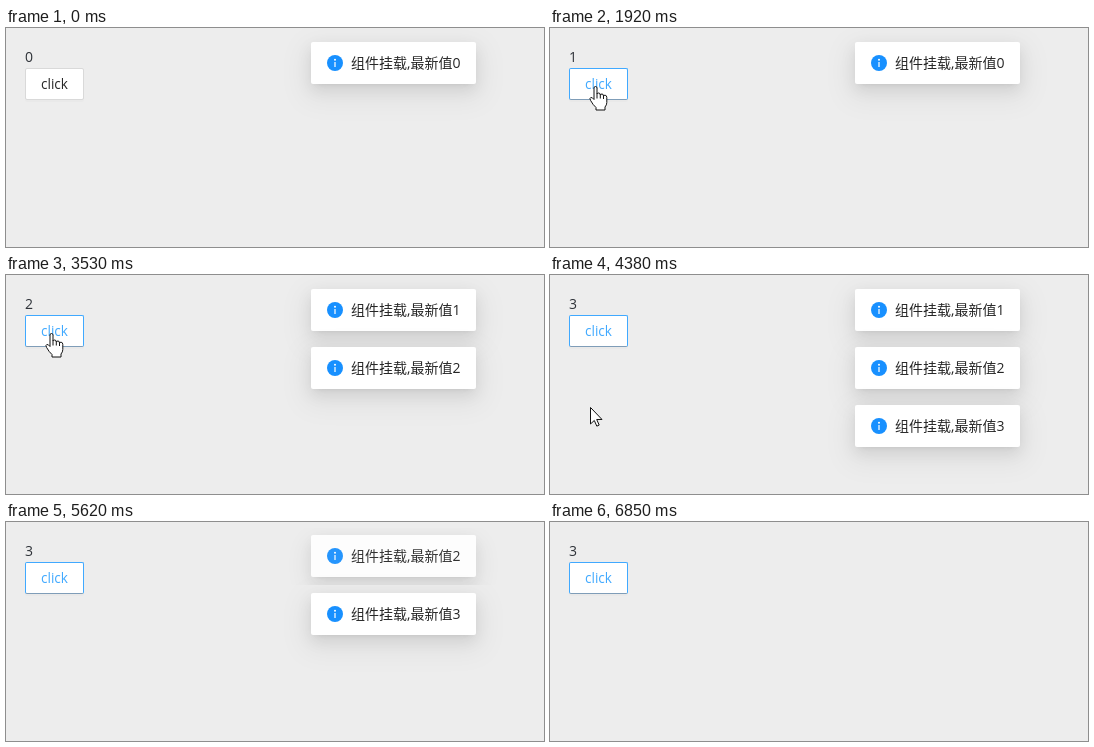
Recreate the animation shown at these times as an HTML page with a canvas. Size 538 px wide and 219 px high, loop 6920 ms.

```html
<!DOCTYPE html>
<html lang="zh-CN">
<head>
<meta charset="utf-8">
<style>
  html, body { margin: 0; width: 100%; height: 100%; overflow: hidden; background: #ededed; }
  body { position: relative; color: #2e3238; font: 14px/22px "Open Sans", "Noto Sans CJK SC", "Noto Sans CJK", sans-serif; }
  #count { position: absolute; left: 19px; top: 18px; }
  #button {
    position: absolute; left: 19px; top: 40px; width: 59px; height: 32px; box-sizing: border-box;
    border: 1px solid; border-radius: 2px; background: #fff; box-shadow: 0 2px 0 rgba(0, 0, 0, .015);
    font-size: 13.6px; line-height: 30px; text-align: center;
  }
  #wave { position: absolute; left: 19px; top: 40px; width: 59px; height: 32px; border-radius: 2px; }
  .notice { position: absolute; left: 0; width: 538px; }
  .card {
    position: absolute; left: 305px; width: 165px; height: 42px; border-radius: 2px; background: #fff;
    color: #262626; white-space: nowrap;
    box-shadow: 0 3px 6px -4px rgba(0, 0, 0, .12), 0 6px 16px rgba(0, 0, 0, .08), 0 9px 28px 8px rgba(0, 0, 0, .05);
  }
  .card svg { position: absolute; left: 16px; top: 13px; }
  .card span { position: absolute; left: 40px; top: 10px; }
  canvas { position: absolute; left: 0; top: 0; }
</style>
</head>
<body>
<div id="count">0</div>
<div id="wave"></div>
<div id="button">click</div>
<div id="list"></div>
<canvas id="pointer" width="538" height="219"></canvas>
<script>
const LOOP = 6920, STEP = 1000 / 13;
const $ = id => document.getElementById(id);
const ctx = $('pointer').getContext('2d');
const clamp = v => Math.min(1, Math.max(0, v));
const lerp = (a, b, p) => a + (b - a) * p;
const progress = (t, start, length) => clamp((t - start) / length);

function bezier(x1, y1, x2, y2) {
  const at = (a, b, s) => 3 * a * s * (1 - s) ** 2 + 3 * b * s * s * (1 - s) + s ** 3;
  return x => {
    if (x <= 0 || x >= 1) return clamp(x);
    let lo = 0, hi = 1;
    for (let i = 0; i < 24; i++) {
      const mid = (lo + hi) / 2;
      if (at(x1, x2, mid) < x) lo = mid; else hi = mid;
    }
    return at(y1, y2, lo);
  };
}
const easeOut = bezier(.08, .82, .17, 1);
const easeIn = bezier(.6, .04, .98, .34);

const notices = [
  { enter: -1000, leave: 2645 },
  { enter: 1960, leave: 4879 },
  { enter: 2581, leave: 5500 },
  { enter: 3577, leave: 6495 }
];
const counts = [1900, 2515, 3580];
const waves = [1985, 2625, 3600];

notices.forEach((n, i) => {
  n.box = document.createElement('div');
  n.box.className = 'notice';
  n.box.innerHTML = `<div class="card">
    <svg width="16" height="16"><circle cx="8" cy="8" r="8" fill="#1890ff"/>
    <circle cx="8" cy="4.8" r="1" fill="#fff"/><rect x="7.4" y="7" width="1.2" height="5" fill="#fff"/></svg>
    <span>组件挂载,最新值${i}</span></div>`;
  n.card = n.box.firstChild;
  $('list').append(n.box);
});

function drawNotices(t) {
  let y = 6;
  for (const n of notices) {
    const alive = t >= n.enter && t < n.leave + 300;
    n.box.style.display = alive ? 'block' : 'none';
    if (!alive) continue;
    const shown = easeOut(progress(t, n.enter, 300));
    const rest = 1 - easeIn(progress(t, n.leave, 300));
    const pad = 8 * rest;
    const height = Math.min(42 + 2 * pad, 150 * rest);
    Object.assign(n.box.style, {
      top: y + 'px',
      height: height + 'px',
      opacity: shown * rest,
      overflow: t > n.leave ? 'hidden' : 'visible',
      transform: shown < 1 ? `translateY(${-58 * (1 - shown)}px)` : 'none'
    });
    n.card.style.top = pad + 'px';
    y += height;
  }
}

function mix(from, to, p) {
  return `rgb(${from.map((v, i) => Math.round(lerp(v, to[i], p)))})`;
}

function drawButton(t) {
  const hover = progress(t, 830, 300);
  const blue = [64, 169, 255], edge = [217, 217, 217];
  const style = $('button').style;
  style.color = mix([38, 38, 38], blue, hover);
  style.borderColor = mix(edge, blue, hover);
  style.borderBottomColor = mix(edge, [127, 157, 184], hover);

  const start = waves.find(w => t >= w && t < w + 330);
  const age = t - start;
  $('wave').style.boxShadow = start === undefined ? 'none' :
    `0 0 0 ${4.5 * easeOut(age / 400)}px rgba(24,144,255,${.2 * (1 - easeOut(age / 2000))})`;
}

const arrow = new Path2D('M0 0V16.5L3.8 13L6.3 18.7L8.7 17.6L6.2 12H11.5Z');
const hand = new Path2D('M-1.5 13V1.5Q-1.5 0 0 0Q1.5 0 1.5 1.5V7.5Q1.8 6.5 3.2 6.5Q4.8 6.5 4.8 8.5' +
  'Q5.2 7.5 6.5 7.5Q8 7.5 8 9.5Q8.4 8.7 9.6 8.7Q11.3 8.9 11.3 11V16Q11.3 18.5 9.5 20.5V23.5H0.5V21' +
  'Q-2.5 18.5 -5 13.8Q-6.2 11.5 -4.7 11Q-3.2 10.6 -1.5 13Z');
const fingers = new Path2D('M1.5 7V12M4.8 8V12M8 9V12.5');

function drawPointer(t) {
  ctx.clearRect(0, 0, 538, 219);
  if (t < 440 || t > 4600) return;
  let x, y;
  if (t < 4140) {
    const p = 1 - (1 - progress(t, 440, 480)) ** 2;
    x = lerp(274, 45.5, p);
    y = lerp(187, 58.5, p);
  } else if (t < 4222) {
    const p = progress(t, 4140, 82);
    x = lerp(45.5, 49.5, p);
    y = lerp(58.5, 70.5, p);
  } else {
    const p = progress(t, 4222, 378);
    x = lerp(49.5, 27.5, p);
    y = lerp(70.5, 222, p);
  }
  const over = x >= 19 && x <= 78 && y >= 40 && y <= 72;
  ctx.save();
  ctx.translate(x, y);
  ctx.lineJoin = 'round';
  ctx.fillStyle = '#fff';
  ctx.strokeStyle = '#111';
  ctx.fill(over ? hand : arrow);
  ctx.stroke(over ? hand : arrow);
  if (over) ctx.stroke(fingers);
  ctx.restore();
}

function render(now) {
  // The screen refreshes 13 times a second.
  const t = Math.floor((now % LOOP + 16) / STEP) * STEP - 8;
  $('count').textContent = counts.filter(c => t >= c).length;
  drawButton(t);
  drawNotices(t);
  drawPointer(t);
}

let origin;
function tick(now) {
  origin ??= now;
  render(now - origin);
  requestAnimationFrame(tick);
}
render(0);
requestAnimationFrame(tick);
</script>
</body>
</html>
```
